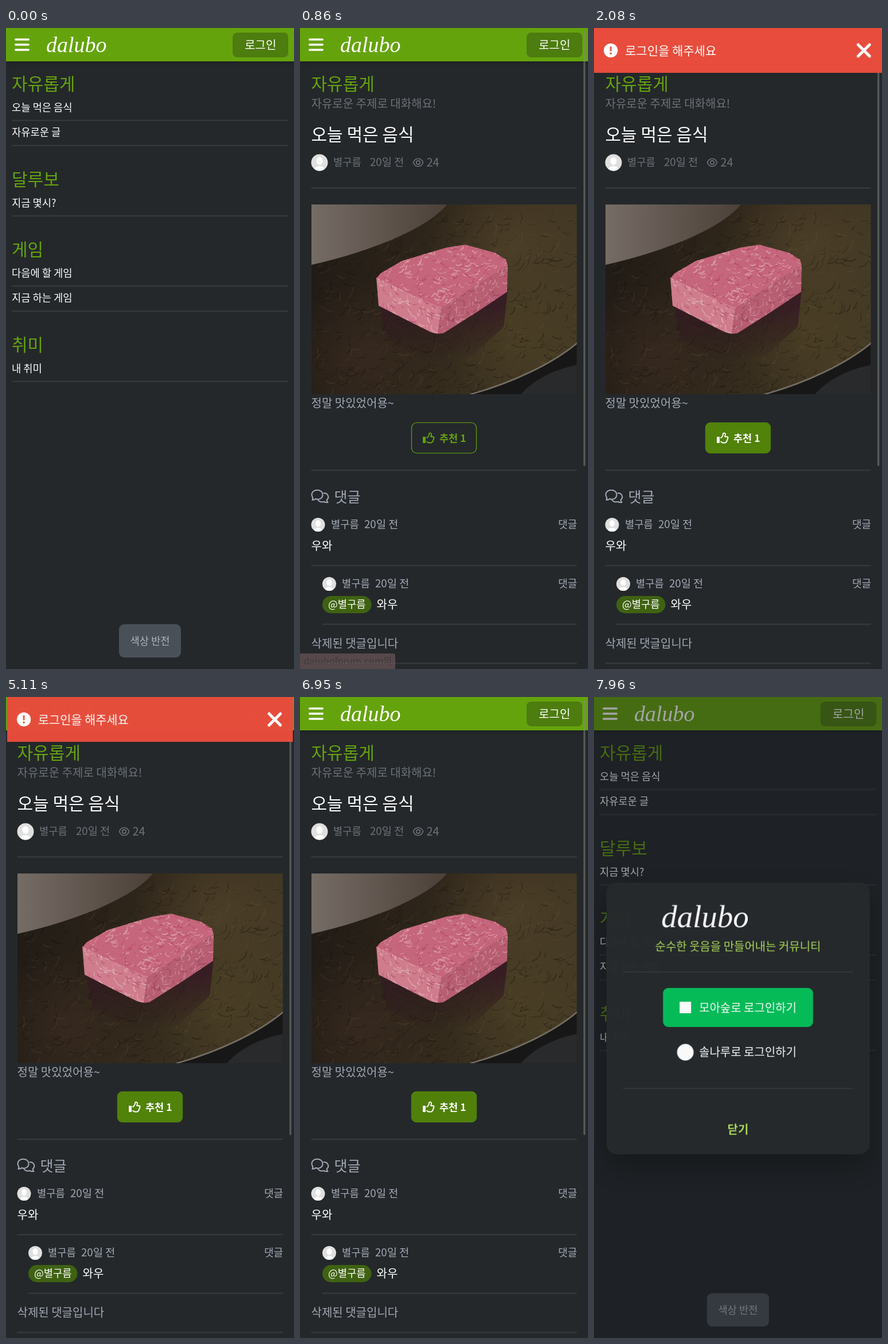
These frames come from a looping animation (502x1115 px, 7.99 s). An HTML page with a canvas:

```html
<!DOCTYPE html>
<html lang="ko">
<head>
<meta charset="utf-8">
<title>dalubo</title>
<style>
html, body { margin: 0; width: 100%; height: 100%; overflow: hidden; background: #24282b; }
canvas { display: block; }
</style>
</head>
<body>
<canvas id="stage" width="502" height="1115"></canvas>
<script>
const W = 502, H = 1115, LOOP = 7990;
const SANS = '"Noto Sans CJK KR", "Noto Sans CJK", "Noto Sans", sans-serif';
const SCRIPT = '"Liberation Serif", "Noto Serif", serif';
const BG = '#24282b', LINE = '#33393d', LIME = '#65a30d', LIME_DARK = '#4d7c0f',
      FOCUS = '#51820a', MUTED = '#6b7177', SOFT = '#a2a8b4', RED = '#e74c3c';
const BRAND = 'dalubo', USER = '별구름';

const clamp = v => Math.min(1, Math.max(0, v));
const span = (t, start, length) => clamp((t - start) / length);

function bezier(x1, y1, x2, y2) {
  const at = (a, b, u) => 3 * a * u * (1 - u) ** 2 + 3 * b * u * u * (1 - u) + u ** 3;
  return x => {
    let lo = 0, hi = 1;
    for (let i = 0; i < 24; i++) {
      const mid = (lo + hi) / 2;
      if (at(x1, x2, mid) < x) lo = mid; else hi = mid;
    }
    return x <= 0 ? 0 : x >= 1 ? 1 : at(y1, y2, lo);
  };
}
const ease = bezier(.25, .1, .25, 1);
const easeOut = bezier(0, 0, .2, 1);
const easeInOut = bezier(.4, 0, .2, 1);

// Drawing helpers

function text(g, str, x, cy, size, color, weight = 400, align = 'left') {
  g.font = `${weight} ${size}px ${SANS}`;
  g.fillStyle = color;
  g.textAlign = align;
  g.fillText(str, x, cy + size * .38);
}

function brand(g, x, base, size) {
  g.font = `italic 400 ${size}px ${SCRIPT}`;
  g.fillStyle = '#fff';
  g.textAlign = 'left';
  g.fillText(BRAND, x, base);
}

function box(g, x, y, w, h, r, color) {
  g.fillStyle = color;
  g.beginPath();
  g.roundRect(x, y, w, h, r);
  g.fill();
}

function disc(g, x, y, r, color) {
  g.fillStyle = color;
  g.beginPath();
  g.arc(x, y, r, 0, Math.PI * 2);
  g.fill();
}

function rule(g, x, y, right) {
  g.fillStyle = LINE;
  g.fillRect(x, y - 1, right - x, 2.4);
}

function path(g, d, x, y, color, width) {
  g.save();
  g.translate(x, y);
  g.strokeStyle = color;
  g.lineWidth = width;
  g.lineCap = g.lineJoin = 'round';
  g.stroke(new Path2D(d));
  g.restore();
}

function poly(g, color, pts) {
  g.fillStyle = color;
  g.beginPath();
  for (let i = 0; i < pts.length; i += 2) g.lineTo(pts[i], pts[i + 1]);
  g.closePath();
  g.fill();
}

function scaled(g, cx, cy, s, alpha, draw) {
  g.save();
  g.translate(cx, cy);
  g.scale(s, s);
  g.translate(-cx, -cy);
  g.globalAlpha = alpha;
  draw();
  g.restore();
}

function layer(draw, w = W, h = H) {
  const c = document.createElement('canvas');
  c.width = w;
  c.height = h;
  draw(c.getContext('2d'));
  return c;
}

function rng(seed) {
  return () => (seed = (seed * 16807) % 2147483647) / 2147483647;
}

// Page parts

function header(g) {
  g.save();
  g.shadowColor = 'rgba(0,0,0,.25)';
  g.shadowBlur = 8;
  g.shadowOffsetY = 2;
  g.fillStyle = LIME;
  g.fillRect(0, 0, W, 58);
  g.restore();
  for (const y of [20, 29, 38]) box(g, 15, y - 1.8, 26, 3.6, 1.8, '#fff');
  brand(g, 70, 42, 38);
}

function avatar(g, x, y, r) {
  g.save();
  disc(g, x, y, r, '#dfdfdf');
  g.clip();
  g.fillStyle = '#fff';
  g.beginPath();
  g.ellipse(x, y - r * .18, r * .38, r * .48, 0, 0, 7);
  g.ellipse(x, y + r * .95, r * .68, r * .52, 0, 0, 7);
  g.fill();
  g.restore();
}

function flecks(g, rand, n, x, y, w, h, len, tilt, colors) {
  g.lineCap = 'round';
  for (let i = 0; i < n; i++) {
    const px = x + rand() * w, py = y + rand() * h;
    const a = tilt + (rand() - .5) * 2, l = len * (.3 + rand());
    g.strokeStyle = colors[i % colors.length];
    g.lineWidth = .6 + rand() * 1.4;
    g.beginPath();
    g.moveTo(px, py);
    g.quadraticCurveTo(px + l * Math.cos(a + .5), py + l * Math.sin(a + .5),
                       px + 1.6 * l * Math.cos(a), py + 1.6 * l * Math.sin(a));
    g.stroke();
  }
}

function face(g, rand, color, colors, tilt, pts) {
  g.save();
  poly(g, color, pts);
  g.clip();
  flecks(g, rand, 620, 130, 375, 236, 160, 5, tilt, colors);
  g.restore();
}

function photo(g) {
  const rand = rng(77);
  g.save();
  g.beginPath();
  g.rect(20, 307, 462.5, 330);
  g.clip();

  let fill = g.createLinearGradient(20, 400, 482, 520);
  fill.addColorStop(0, '#211b16');
  fill.addColorStop(.45, '#30271b');
  fill.addColorStop(1, '#443a25');
  g.fillStyle = fill;
  g.fillRect(20, 307, 463, 330);
  for (const [x, y, r, c] of [[370, 380, 150, '88,72,45'], [380, 530, 130, '82,69,38'], [110, 570, 130, '62,45,34']]) {
    fill = g.createRadialGradient(x, y, 0, x, y, r);
    fill.addColorStop(0, `rgba(${c},.6)`);
    fill.addColorStop(1, `rgba(${c},0)`);
    g.fillStyle = fill;
    g.fillRect(20, 307, 463, 330);
  }
  flecks(g, rand, 700, 20, 330, 463, 310, 11, -.5,
         ['rgba(15,12,9,.35)', 'rgba(110,91,58,.22)', 'rgba(20,16,12,.3)']);

  fill = g.createLinearGradient(20, 0, 250, 0);
  fill.addColorStop(0, '#756c65');
  fill.addColorStop(1, '#4d4139');
  g.fillStyle = fill;
  g.fill(new Path2D('M20 307H256C220 352 110 392 20 412Z'));

  g.fillStyle = '#171717';
  g.fill(new Path2D('M298 637C370 617 440 584 483 548V637Z'));
  path(g, 'M298 637C370 617 440 584 483 548', 0, 0, '#746d63', 2.5);
  g.fillStyle = '#292a2b';
  g.fill(new Path2D('M385 637C415 604 455 592 483 586V637Z'));

  fill = g.createLinearGradient(0, 480, 0, 585);
  fill.addColorStop(0, 'rgba(54,27,36,.95)');
  fill.addColorStop(1, 'rgba(40,23,26,0)');
  poly(g, fill, [138, 476, 362, 455, 355, 520, 300, 570, 220, 582, 150, 540]);

  const pinks = ['#d88f9c', '#b84e69', '#d9a0a8'];
  face(g, rand, '#c5667c', pinks, -.3,
       [133, 436, 140, 427, 178, 405, 255, 382, 288, 377, 340, 391, 359, 403, 362, 413, 247, 489, 195, 466]);
  face(g, rand, '#cf7c8d', ['#e0a3ab', '#b75871', '#dcaab0'], .9,
       [133, 434, 195, 464, 247, 487, 240, 532, 228, 529, 180, 505, 137, 483]);
  face(g, rand, '#b75e73', ['#cf8794', '#a14961', '#c78c93'], -.9,
       [247, 487, 362, 411, 361, 459, 310, 493, 250, 531, 240, 532]);
  g.restore();
}

function byline(g, x, y, avatarX) {
  avatar(g, avatarX, y + 1, 12);
  text(g, USER, x, y, 17.7, SOFT, 300);
  text(g, '20일 전', x + 58, y, 18.7, SOFT, 300);
  text(g, '댓글', 483, y, 18, SOFT, 300, 'right');
}

const listPage = layer(g => {
  g.fillStyle = BG;
  g.fillRect(0, 0, W, H);
  const groups = [
    [97, '자유롭게', ['오늘 먹은 음식', '자유로운 글']],
    [263, '달루보', ['지금 몇시?']],
    [385, '게임', ['다음에 할 게임', '지금 하는 게임']],
    [551, '취미', ['내 취미']]
  ];
  for (const [y, title, items] of groups) {
    text(g, title, 10, y, 30, LIME, 500);
    items.forEach((item, i) => {
      const row = y + 41 + i * 43.7;
      text(g, item, 10, row, 17.7, '#fff');
      rule(g, 10, row + 22.6, 492);
    });
  }
  box(g, 197, 1037, 108, 58, 9, '#495057');
  text(g, '색상 반전', 251, 1066, 17.7, '#adb5bd', 400, 'center');
  header(g);
});

const postPage = layer(g => {
  g.fillStyle = BG;
  g.fillRect(0, 0, W, H);
  text(g, '자유롭게', 19.5, 97, 30, LIME, 500);
  text(g, '자유로운 주제로 대화해요!', 19.5, 131, 20, MUTED, 300);
  text(g, '오늘 먹은 음식', 19.5, 185, 30, '#fff', 500);
  avatar(g, 34, 234, 14.5);
  text(g, USER, 58, 233, 17.7, MUTED, 300);
  text(g, '20일 전', 122, 233, 18.7, MUTED, 300);
  path(g, 'M-8.5 0C-5-9 5-9 8.5 0C5 9-5 9-8.5 0Z M3.2 0A3.2 3.2 0 1 1-3.2 0A3.2 3.2 0 1 1 3.2 0', 206, 234, MUTED, 1.7);
  text(g, '24', 220.5, 233.5, 20, MUTED, 300);
  rule(g, 19.5, 278, 482.5);
  photo(g);
  text(g, '정말 맛있었어용~', 19.5, 652, 20, SOFT, 300);
  rule(g, 19.5, 769, 482.5);
  path(g, 'M2 18C5 14 1 13 1 9C1-2 20-2 20 9C20 16 12 18 8 16C6 18 4 18 2 18Z M22 6C30 6 32 14 27 18C27 20 29 22 29 22C26 23 24 22 22 21C18 22 14 21 12 18', 19.5, 803, SOFT, 2);
  text(g, '댓글', 59.5, 815, 25, SOFT, 500);
  byline(g, 54, 863, 31.5);
  text(g, '우와', 19.5, 900, 20, '#fff');
  rule(g, 19.5, 935, 482.5);
  byline(g, 73, 966, 51);
  box(g, 39, 988, 85.5, 30, 15, '#3f6212');
  text(g, '@' + USER, 49, 1002.5, 17.7, '#fff');
  text(g, '와우', 133.5, 1002.5, 20, '#fff');
  rule(g, 39, 1037, 482.5);
  text(g, '삭제된 댓글입니다', 19.5, 1070, 20, SOFT, 300);
  rule(g, 19.5, 1105, 482.5);
  header(g);
});

const toast = layer(g => {
  g.fillStyle = RED;
  g.fillRect(0, 0, W, 78);
  disc(g, 29, 39, 12.2, '#fff');
  box(g, 27.6, 32, 2.8, 8.5, 1.2, RED);
  disc(g, 29, 44.3, 1.7, RED);
  text(g, '로그인을 해주세요', 54, 39, 21, '#fff');
  path(g, 'M-10-10L10 10M10-10L-10 10', 470.5, 39, '#fff', 5);
}, W, 78);

const modal = layer(g => {
  g.save();
  g.shadowColor = 'rgba(0,0,0,.25)';
  g.shadowBlur = 50;
  g.shadowOffsetY = 22;
  box(g, 21, 322, 460, 474, 18, '#262a2d');
  g.restore();
  brand(g, 117, 400, 55);
  text(g, '순수한 웃음을 만들어내는 커뮤니티', 251, 433, 20, '#b0df5a', 400, 'center');
  rule(g, 50, 478, 452);
  box(g, 120, 506, 262, 68, 9, '#06c05a');
  g.fillStyle = '#fff';
  g.fillRect(149, 530, 20, 20);
  text(g, '모아숲로 로그인하기'.replace('로 ', '으로 ').replace('으로', '로'), 183, 540, 20, '#fff', 500);
  disc(g, 159, 618, 14.5, '#fff');
  text(g, '솔나루로 로그인하기', 183, 617, 20, '#fff', 500);
  rule(g, 50, 681, 452);
  text(g, '닫기', 251, 752, 20, '#b0df5a', 700, 'center');
});

// Moving parts

const g = document.getElementById('stage').getContext('2d');

function pressScale(t, press, release) {
  if (t < press) return 1;
  if (t < release) return .97;
  const p = span(t, release, 250);
  return p < .4 ? .98 + .04 * easeOut(p / .4) : 1.02 - .02 * easeOut((p - .4) / .6);
}

function loginButton(t) {
  scaled(g, 443.5, 29.5, pressScale(t, 7630, 7800), 1, () => {
    box(g, 395, 8, 97, 43, 8, LIME_DARK);
    text(g, '로그인', 443.5, 29, 20, '#fff', 400, 'center');
  });
}

function likeLabel(color) {
  path(g, 'M1 8H4V17H1Z M7 9C10 7 11 4 11 2C11 0 15 0 15 3C15 5 14 7 14 7H18C20 7 20 10 18.500 10.500C19.500 12 18.500 13 17.500 13.500C18 15 17 16 16 16.500C16 17 15 17.500 14 17.500H11C9 17.500 8 16 7 15.500', 214, 704, color, 1.9);
  g.fillStyle = color;
  g.fillRect(214.5, 711, 4, 10);
  text(g, '추천 1', 243, 713, 17.5, color, 700);
}

function likeButton(t) {
  const hover = easeInOut(span(t, 1330, 200)) - easeInOut(span(t, 6935, 200));
  scaled(g, 251, 713, pressScale(t, 1370, 1420), 1, () => {
    g.strokeStyle = LIME;
    g.lineWidth = 1.2;
    g.beginPath();
    g.roundRect(194.5, 686.5, 113, 53, 9);
    g.stroke();
    g.globalAlpha = 1 - hover;
    likeLabel(LIME);
    g.globalAlpha = hover;
    box(g, 194, 686, 114, 54, 9, FOCUS);
    likeLabel('#fff');
  });
}

function statusBubble(t) {
  const a = span(t, 500, 120) - span(t, 740, 200);
  if (a <= 0) return;
  g.save();
  g.globalAlpha = a;
  box(g, 0, 1088, 166, 27, [0, 4, 0, 0], '#a2797b');
  text(g, BRAND + 'forum.com의...', 6, 1101, 16.5, '#25282c', 300);
  g.restore();
}

function drawToast(t) {
  if (t < 1414 || t > 5452) return;
  const enter = span(t, 1414, 700), leave = ease(span(t, 5102, 350));
  const size = t < 5102 ? .3 + .7 * ease(enter) : 1 - .7 * leave;
  const alpha = t < 5102 ? ease(clamp(enter * 2)) : 1 - leave;
  scaled(g, W / 2, 39, size, alpha, () => g.drawImage(toast, 0, 0));
}

function drawModal(t) {
  const p = easeInOut(span(t, 7800, 200));
  if (p <= 0) return;
  g.save();
  g.globalAlpha = .4 * p;
  g.fillStyle = '#16181d';
  g.fillRect(0, 0, W, H);
  g.restore();
  scaled(g, W / 2, 559, .9 + .1 * p, p, () => g.drawImage(modal, 0, 0));
}

function render(t) {
  const onPost = t >= 530 && t < 7320;
  g.drawImage(onPost ? postPage : listPage, 0, 0);
  loginButton(t);
  if (onPost) {
    likeButton(t);
    box(g, 494, 5, 3.4, 757, 1.7, 'rgba(135,135,135,.5)');
  }
  statusBubble(t);
  drawToast(t);
  drawModal(t);
}

const start = performance.now();
function tick() {
  render((performance.now() - start) % LOOP);
  requestAnimationFrame(tick);
}
tick();
</script>
</body>
</html>
```
